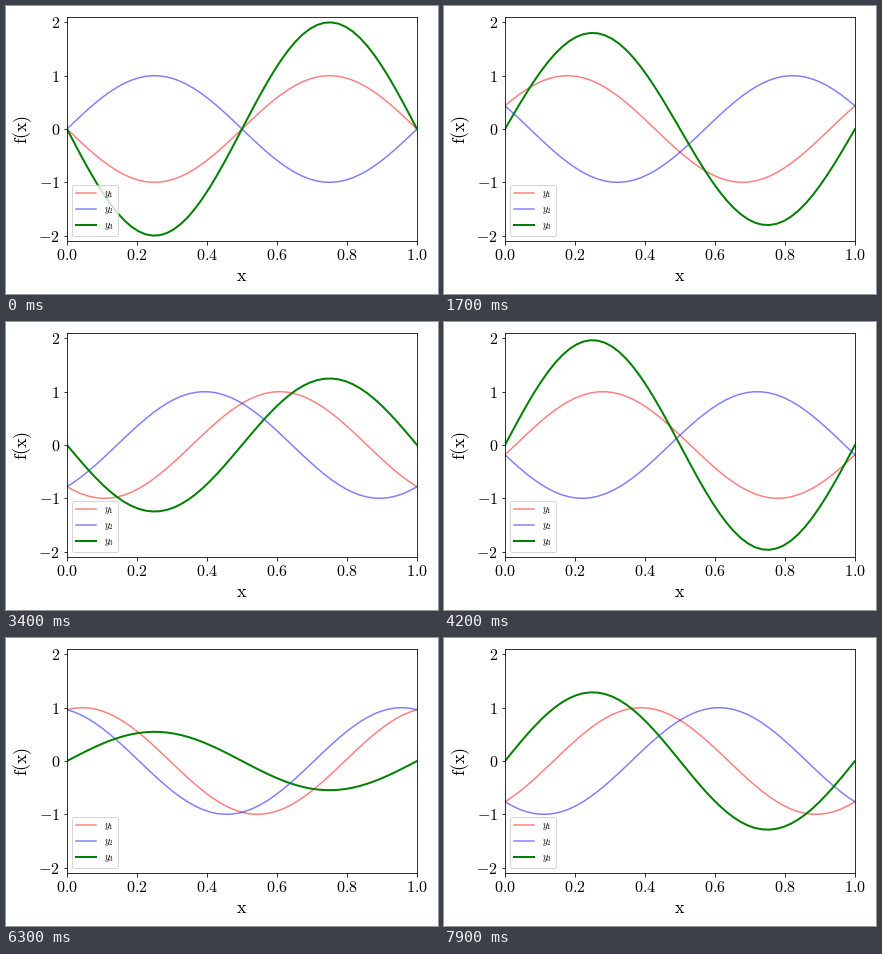
These frames come from a looping animation (432 by 288 pixels, 8 s). A matplotlib script:

```python
import numpy as np
import matplotlib.pyplot as plt
from matplotlib.animation import FuncAnimation

W, H, DPI = 432, 288, 72
FRAMES, INTERVAL = 80, 100
STEP = 2 * np.pi * 10 / 119  # phase advance per frame

plt.rcParams.update({
    "font.family": "Liberation Serif",
    "mathtext.fontset": "cm",
})

fig = plt.figure(figsize=(W / DPI, H / DPI), dpi=DPI)
left, right, top, bottom = 61, 411, 11, 235
ax = fig.add_axes([left / W, 1 - bottom / H, (right - left) / W, (bottom - top) / H])
ax.set_xlim(0, 1)
ax.set_ylim(-2.1, 2.1)

xticks = np.linspace(0, 1, 6)
yticks = range(-2, 3)
ax.set_xticks(xticks, [f"${v:.1f}$" for v in xticks], fontsize=16)
ax.set_yticks(yticks, [f"${v}$" for v in yticks], fontsize=16)
ax.set_xlabel(r"$\mathrm{x}$", fontsize=18)
ax.set_ylabel(r"$\mathrm{f(x)}$", fontsize=18)

x = np.linspace(0, 1, 50)
kx = 2 * np.pi * x

line1, = ax.plot([], [], color="red", alpha=0.5, lw=1.5, label="$y_1$")
line2, = ax.plot([], [], color="blue", alpha=0.5, lw=1.5, label="$y_2$")
line3, = ax.plot([], [], color="green", lw=2, label="$y_3$")
ax.legend(loc="lower left", fontsize=10)


def update(i):
    """Two opposite travelling waves and the standing wave they form."""
    phase = STEP * i
    y1 = np.sin(phase - kx)
    y2 = np.sin(phase + kx)
    line1.set_data(x, y1)
    line2.set_data(x, y2)
    line3.set_data(x, y1 - y2)
    return line1, line2, line3


anim = FuncAnimation(fig, update, frames=FRAMES, interval=INTERVAL,
                     repeat=True, repeat_delay=0, blit=False)
plt.show()
```
